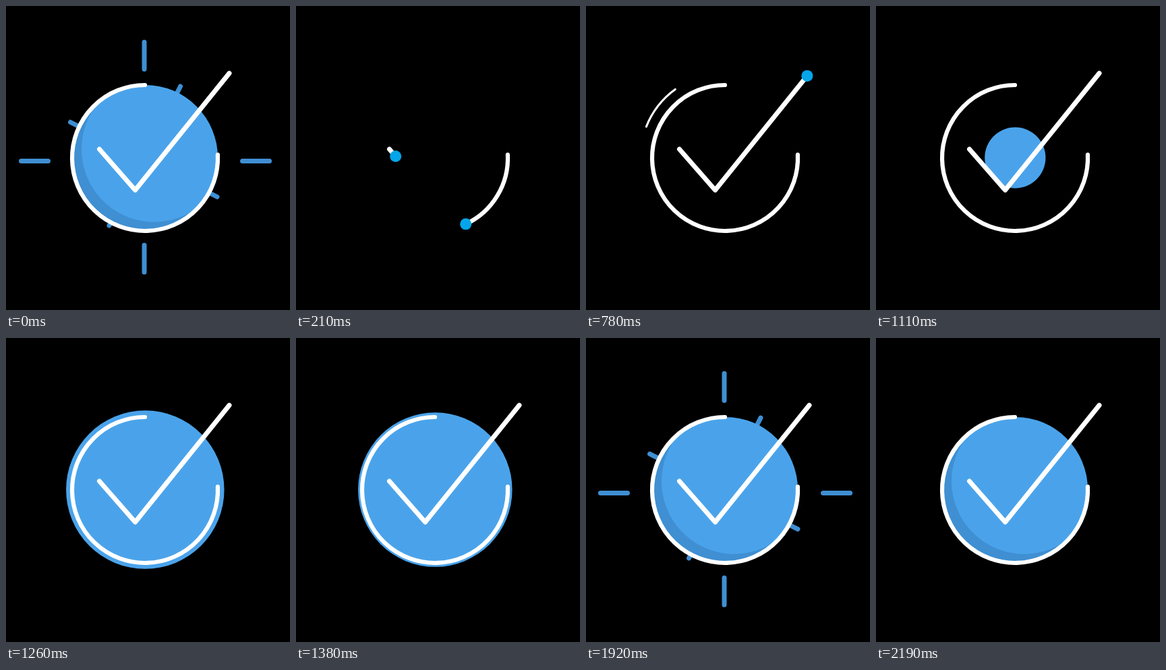
Animation, 421 px wide and 450 px high, one loop 3.27 s. Source, as an HTML page:

```html
<!DOCTYPE html>
<html lang="en">
<head>
<meta charset="utf-8">
<title>Check mark</title>
<style>
  html, body { margin: 0; width: 100%; height: 100%; overflow: hidden; background: #000; }
  svg { display: block; width: 100%; height: 100%; }
  .line { fill: none; stroke: #fff; stroke-linecap: round; stroke-linejoin: round; }
  .dot { fill: #06a5e9; }
</style>
</head>
<body>
<svg viewBox="0 0 421 450">
  <g id="rays" stroke="#3f8fd2" stroke-width="7" stroke-linecap="round"></g>
  <circle id="disc" cx="206.3" cy="224.6" fill="#4aa3ea"/>
  <path id="shade" fill="#3f8fd2" d="M140.3 139.3A107.7 107.7 0 1 0 286.3 296.7A107.7 107.7 0 0 1 140.3 139.3Z"/>
  <path id="swoosh" class="line" stroke-width="3"/>
  <path id="arc" class="line" stroke-width="6.2"/>
  <path id="check" class="line" stroke-width="7" d="M138.5 212L191.5 272.5L331 99.5"/>
  <circle id="arcDot" class="dot" r="8.5"/>
  <circle id="checkDot" class="dot"/>
</svg>
<script>
const LOOP = 3270;
const CX = 206, CY = 225, R = 108, SWOOSH_R = 125.5;
const ARC_FROM = -2.6, ARC_TO = 270;

const $ = id => document.getElementById(id);
const [rays, disc, shade, swoosh, arc, check, arcDot, checkDot] =
  ['rays', 'disc', 'shade', 'swoosh', 'arc', 'check', 'arcDot', 'checkDot'].map($);

const set = (el, attrs) => { for (const k in attrs) el.setAttribute(k, attrs[k]); };
const show = (el, on) => set(el, { visibility: on ? 'visible' : 'hidden' });
const ramp = (t, a, b) => Math.min(1, Math.max(0, (t - a) / (b - a)));
const smooth = (t, a, b) => { const u = ramp(t, a, b); return u * u * (3 - 2 * u); };
const mix = (a, b, u) => a + (b - a) * u;

function polar(r, deg) {
  const a = deg * Math.PI / 180;
  return [CX + r * Math.cos(a), CY + r * Math.sin(a)];
}

function arcPath(r, from, to) {
  return `M${polar(r, from)}A${r} ${r} 0 ${to - from > 180 ? 1 : 0} 1 ${polar(r, to)}`;
}

// Outer tip and outward direction of each ray
const RAY_LEN = 40;
const rayList = [
  [22.5, 229.5, -1, 0], [390.5, 229.5, 1, 0], [205, 53.5, 0, -1], [205, 394, 0, 1],
  [95.5, 172, -.89, -.45], [258.5, 119, .45, -.89], [313, 282.5, .89, .45], [153, 325, -.45, .89]
].map(([x, y, dx, dy]) => {
  const el = document.createElementNS('http://www.w3.org/2000/svg', 'line');
  rays.append(el);
  return { el, x, y, dx, dy };
});

function drawRays(t, poster) {
  show(rays, poster || (t > 1530 && t < 2190));
  const inset = poster ? 0
    : t < 1937 ? mix(99, -1, smooth(t, 1530, 1890))
    : 14 * ((t - 1937) / 103) ** 2 - 1;
  for (const { el, x, y, dx, dy } of rayList) {
    const x1 = x - dx * inset, y1 = y - dy * inset;
    set(el, { x1, y1, x2: x1 - dx * RAY_LEN, y2: y1 - dy * RAY_LEN });
  }
}

function discRadius(t) {
  if (t < 1305) return 123.5 * smooth(t, 975, 1305);
  if (t < 1455) return mix(123.5, 105, smooth(t, 1305, 1455));
  return mix(105, 107.7, smooth(t, 1455, 1515));
}

const checkLen = check.getTotalLength();

function drawLines(t, poster) {
  const a = poster ? 1 : ramp(t, 30, 756);
  const end = mix(ARC_FROM, ARC_TO, a);
  const [ax, ay] = polar(R, end);
  set(arc, { d: arcPath(R, ARC_FROM, end) });
  set(arcDot, { cx: ax, cy: ay });
  show(arcDot, a < 1);

  const c = poster ? 1 : ramp(t, 182, 790);
  const tip = check.getPointAtLength(c * checkLen);
  set(check, { 'stroke-dasharray': c < 1 ? `${c * checkLen} ${checkLen * 2}` : 'none' });
  set(checkDot, { cx: tip.x, cy: tip.y, r: 8.5 + 2.5 * ramp(t, 790, 810) });
  show(check, c > 0);
  show(checkDot, c > 0 && t < 835 && !poster);

  const head = 127 + .357 * (t - 480);
  const tail = 114.7 + .29 * (t - 480) + 22 * ramp(t, 780, 830);
  show(swoosh, t > 300 && t < 835 && head > tail);
  if (head > tail) set(swoosh, { d: arcPath(SWOOSH_R, tail, head) });
}

function draw(t) {
  const poster = t < 30;
  drawRays(t, poster);
  set(disc, { r: poster ? 107.7 : discRadius(t) });
  set(shade, { opacity: poster ? 1 : ramp(t, 1530, 1770) });
  drawLines(t, poster);
}

let start;
function tick(now) {
  start ??= now;
  draw((now - start) % LOOP);
  requestAnimationFrame(tick);
}
draw(0);
requestAnimationFrame(tick);
</script>
</body>
</html>
```
